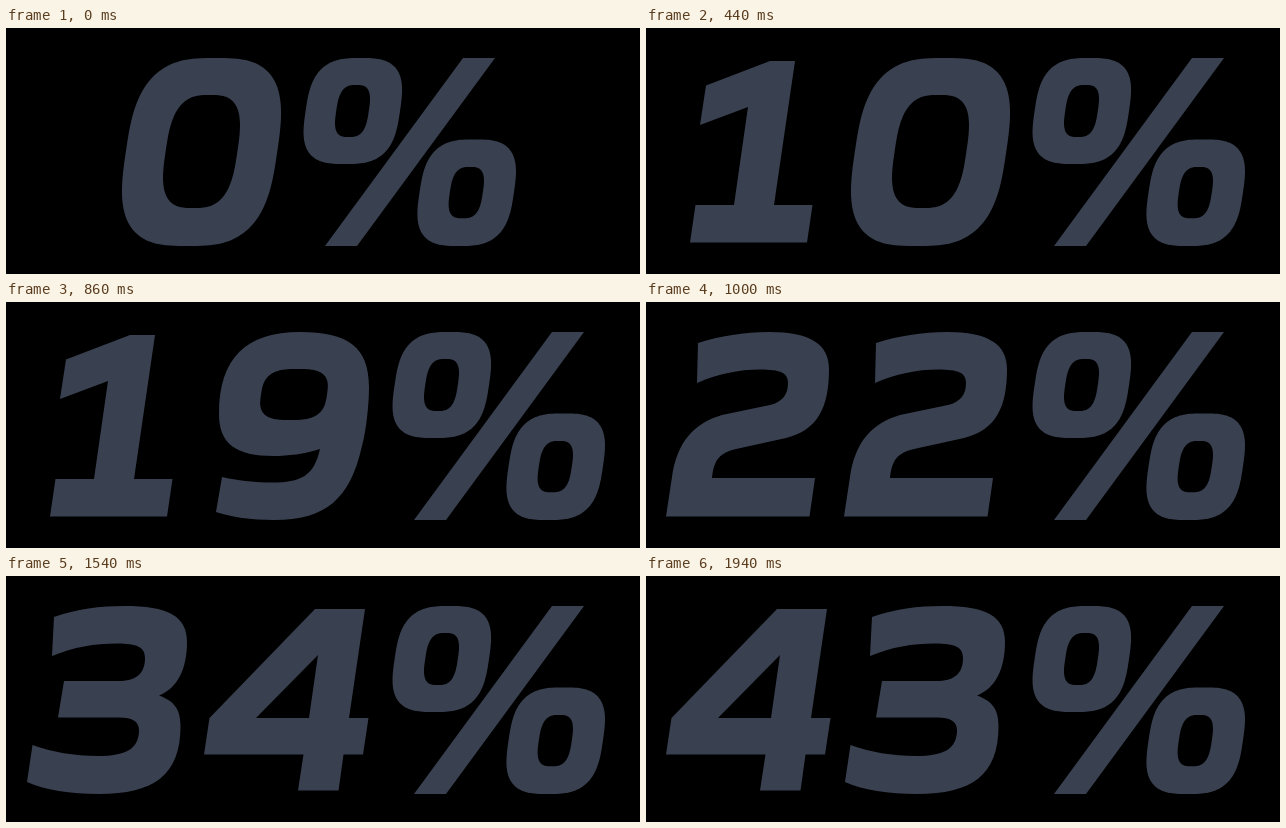
These frames come from a looping animation (634x246 px, 2000 ms). An HTML page with a canvas:

```html
<!DOCTYPE html>
<html lang="en">
<head>
<meta charset="utf-8">
<title>Percent counter</title>
<style>
  html, body { margin: 0; width: 100%; height: 100%; overflow: hidden; background: #000; }
  canvas { display: block; width: 634px; height: 246px; }
</style>
</head>
<body>
<canvas id="stage" width="634" height="246" role="img" aria-label="Percent counter"></canvas>
<script>
const ctx = document.getElementById('stage').getContext('2d');
const LOOP = 2000, TICK = 20, STEPS = 44;
const ADVANCE = 178, SLANT = 0.146;
const INK = '#394151';
const glyphs = {};

// Slanted superellipse; a negative dir winds backwards and cuts a hole.
function oval(path, cx, cy, rx, ry, dir = 1) {
  const bend = v => Math.sign(v) * Math.abs(v) ** (2 / 3);
  const count = 160;
  for (let i = 0; i < count; i++) {
    const a = dir * i / count * Math.PI * 2;
    const dy = ry * bend(Math.sin(a));
    const x = cx + rx * bend(Math.cos(a)) - SLANT * dy;
    if (i) path.lineTo(x, cy + dy);
    else path.moveTo(x, cy + dy);
  }
  path.closePath();
}

function glyph(name, outline, ...ovals) {
  const path = new Path2D(outline);
  for (const o of ovals) oval(path, ...o);
  glyphs[name] = path;
}

glyph('0', '', [106.5, 124, 75.7, 94], [106.5, 123.5, 35.9, 56.5, -1]);

glyph('1', 'M124 33H149L128 177H166.5L161 214.5H44L49.5 177H88L102 79L54 97L60 57.5Z');

glyph('2', `M52 41C74 34 98 30 123 30C164 30 183 42 183 67C183 105 172 128 140 136
  L90 147C74 151 68 157 66 176H169L163.5 214.5H20L26 175C31 140 48 121 76 113
  L124 103C137 100 142 92 142 81C142 71 135 67.5 114 67.5C92 67.5 72 72 51 81Z`);

glyph('3', `M48 41C70 33 95 30 118 30C162 30 181 40 181 66C181 92 172 112 153 119.5
  C168 125 174.5 133 174.5 150C174.5 199 148 218 93 218C65 218 38 214 21 206
  L26.5 169C46 176 68 180 92 180C120 180 133 173 133 154C133 146 127 141.5 113 141.5
  H52L58 105H112C130 105 139 98 139 82C139 71 131 67.5 111 67.5C88 67.5 68 71 46 80Z`);

glyph('4', `M131 33H181L165 142H184.5L179 178.5H159.5L154.5 214.5H114L119.5 178.5H20L25.5 142Z
  M134 79L72 142H125Z`);

glyph('5', `M56 33H183L177 71.5H85L79 107C91 102 104 99.5 120 99.5C158 99.5 177 112 177 140
  C177 192 151 218 89 218C63 218 39 213.5 23 206L28.5 169C45 176 67 180 89 180
  C118 180 135 171 135 151C135 141 128 136 110 136C92 136 79 139 64 146L37 130Z`);

glyph('6', `M122 30C145 30 165 33 180 38L174 73C156 69 140 67.5 124 67.5
  C95 67.5 82 74 76 101C92 96 108 94 122 94C160 94 177 106 177 136
  C177 192 150 218 96 218C48 218 27 203 27 163C27 145 30 118 34 104
  C46 51 70 30 122 30Z`, [102, 155.5, 33, 25.5, -1]);

glyph('7', 'M46 33H192.5L187.5 68L78 214.5H26.5L135 72.5H40Z');

glyph('8', '', [111, 80, 71, 50], [101, 164, 75, 54],
  [110, 86, 32, 20.5, -1], [101.5, 161, 34.5, 22, -1]);

// A nine is a six turned upside down.
glyphs['9'] = new Path2D();
glyphs['9'].addPath(glyphs['6'], new DOMMatrix([-1, 0, 0, -1, 212, 248]));

glyph('%', 'M190 30H222L84 218H52Z',
  [79.8, 83, 47.2, 53], [79.5, 83, 16.3, 26, -1],
  [193.7, 164.7, 47.2, 53.3], [193.3, 164.6, 16.5, 25.7, -1]);

// Each of the 44 values starts on a 20 ms tick.
function valueAt(ms) {
  const tick = Math.floor(ms / TICK) + 1;
  return Math.ceil(tick * STEPS * TICK / LOOP) - 1;
}

function draw(value) {
  const text = value + '%';
  ctx.setTransform(1, 0, 0, 1, 0, 0);
  ctx.fillStyle = '#000';
  ctx.fillRect(0, 0, 634, 246);
  ctx.fillStyle = INK;
  ctx.translate((3 - text.length) * ADVANCE / 2, 0);
  for (const ch of text) {
    ctx.fill(glyphs[ch]);
    ctx.translate(ADVANCE, 0);
  }
}

const start = performance.now();
function frame() {
  draw(valueAt((performance.now() - start) % LOOP));
  requestAnimationFrame(frame);
}
frame();
</script>
</body>
</html>
```
